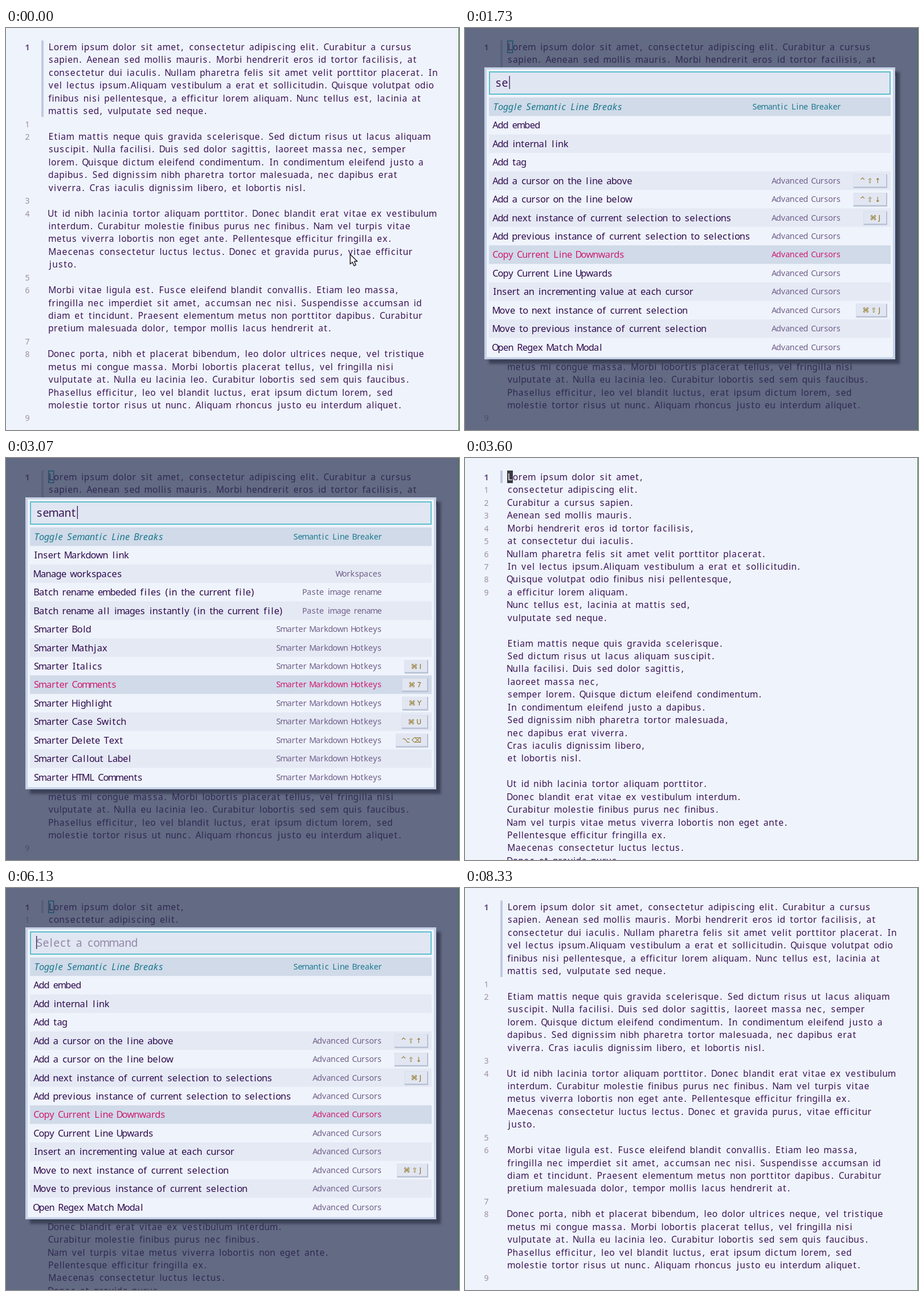
An HTML page with a canvas that plays this animation: 795 px wide and 705 px high, repeating every 9.03 s.

```html
<!DOCTYPE html>
<html lang="en">
<head>
<meta charset="utf-8">
<title>Semantic line breaks</title>
<style>
  html, body { margin: 0; width: 100%; height: 100%; overflow: hidden; background: #eff3fb; }
  canvas { display: block; }
</style>
</head>
<body>
<canvas id="stage" width="795" height="705"></canvas>
<script>
const ctx = document.getElementById('stage').getContext('2d');
const LOOP = 9030, LINE = 22.43, ROW = 32.43;
const SANS = '"Noto Sans", "Open Sans", sans-serif';

const wrapped = `Lorem ipsum dolor sit amet, consectetur adipiscing elit. Curabitur a cursus
sapien. Aenean sed mollis mauris. Morbi hendrerit eros id tortor facilisis, at
consectetur dui iaculis. Nullam pharetra felis sit amet velit porttitor placerat. In
vel lectus ipsum.Aliquam vestibulum a erat et sollicitudin. Quisque volutpat odio
finibus nisi pellentesque, a efficitur lorem aliquam. Nunc tellus est, lacinia at
mattis sed, vulputate sed neque.

Etiam mattis neque quis gravida scelerisque. Sed dictum risus ut lacus aliquam
suscipit. Nulla facilisi. Duis sed dolor sagittis, laoreet massa nec, semper
lorem. Quisque dictum eleifend condimentum. In condimentum eleifend justo a
dapibus. Sed dignissim nibh pharetra tortor malesuada, nec dapibus erat
viverra. Cras iaculis dignissim libero, et lobortis nisl.

Ut id nibh lacinia tortor aliquam porttitor. Donec blandit erat vitae ex vestibulum
interdum. Curabitur molestie finibus purus nec finibus. Nam vel turpis vitae
metus viverra lobortis non eget ante. Pellentesque efficitur fringilla ex.
Maecenas consectetur luctus lectus. Donec et gravida purus, vitae efficitur
justo.

Morbi vitae ligula est. Fusce eleifend blandit convallis. Etiam leo massa,
fringilla nec imperdiet sit amet, accumsan nec nisi. Suspendisse accumsan id
diam et tincidunt. Praesent elementum metus non porttitor dapibus. Curabitur
pretium malesuada dolor, tempor mollis lacus hendrerit at.

Donec porta, nibh et placerat bibendum, leo dolor ultrices neque, vel tristique
metus mi congue massa. Morbi lobortis placerat tellus, vel fringilla nisi
vulputate at. Nulla eu lacinia leo. Curabitur lobortis sed sem quis faucibus.
Phasellus efficitur, leo vel blandit luctus, erat ipsum dictum lorem, sed
molestie tortor risus ut nunc. Aliquam rhoncus justo eu interdum aliquet.
`.split('\n');

const broken = `Lorem ipsum dolor sit amet,
consectetur adipiscing elit.
Curabitur a cursus sapien.
Aenean sed mollis mauris.
Morbi hendrerit eros id tortor facilisis,
at consectetur dui iaculis.
Nullam pharetra felis sit amet velit porttitor placerat.
In vel lectus ipsum.Aliquam vestibulum a erat et sollicitudin.
Quisque volutpat odio finibus nisi pellentesque,
a efficitur lorem aliquam.
Nunc tellus est, lacinia at mattis sed,
vulputate sed neque.

Etiam mattis neque quis gravida scelerisque.
Sed dictum risus ut lacus aliquam suscipit.
Nulla facilisi. Duis sed dolor sagittis,
laoreet massa nec,
semper lorem. Quisque dictum eleifend condimentum.
In condimentum eleifend justo a dapibus.
Sed dignissim nibh pharetra tortor malesuada,
nec dapibus erat viverra.
Cras iaculis dignissim libero,
et lobortis nisl.

Ut id nibh lacinia tortor aliquam porttitor.
Donec blandit erat vitae ex vestibulum interdum.
Curabitur molestie finibus purus nec finibus.
Nam vel turpis vitae metus viverra lobortis non eget ante.
Pellentesque efficitur fringilla ex.
Maecenas consectetur luctus lectus.
Donec et gravida purus,`.split('\n');

// Each command: title | plugin | hotkey
const parse = list => list.split('\n').map(line => line.split('|'));

const allCommands = parse(`Toggle Semantic Line Breaks|Semantic Line Breaker
Add embed
Add internal link
Add tag
Add a cursor on the line above|Advanced Cursors|^⇧↑
Add a cursor on the line below|Advanced Cursors|^⇧↓
Add next instance of current selection to selections|Advanced Cursors|⌘J
Add previous instance of current selection to selections|Advanced Cursors
Copy Current Line Downwards|Advanced Cursors
Copy Current Line Upwards|Advanced Cursors
Insert an incrementing value at each cursor|Advanced Cursors
Move to next instance of current selection|Advanced Cursors|⌘⇧J
Move to previous instance of current selection|Advanced Cursors
Open Regex Match Modal|Advanced Cursors`);

const foundCommands = parse(`Toggle Semantic Line Breaks|Semantic Line Breaker
Insert Markdown link
Manage workspaces|Workspaces
Batch rename embeded files (in the current file)|Paste image rename
Batch rename all images instantly (in the current file)|Paste image rename
Smarter Bold|Smarter Markdown Hotkeys
Smarter Mathjax|Smarter Markdown Hotkeys
Smarter Italics|Smarter Markdown Hotkeys|⌘I
Smarter Comments|Smarter Markdown Hotkeys|⌘7
Smarter Highlight|Smarter Markdown Hotkeys|⌘Y
Smarter Case Switch|Smarter Markdown Hotkeys|⌘U
Smarter Delete Text|Smarter Markdown Hotkeys|⌥⌫
Smarter Callout Label|Smarter Markdown Hotkeys
Smarter HTML Comments|Smarter Markdown Hotkeys`);

// Both typefaces are near-monospaced: a few letter classes, one advance each.
function editorAdvance(ch) {
  if ('mMwW'.includes(ch)) return 14.4;
  if ('il'.includes(ch)) return 5;
  if (ch === 'f') return 6;
  return 'Ijrt .,'.includes(ch) ? 7.3 : 9.6;
}
function menuAdvance(ch) {
  if (ch === 'm') return 13;
  if ('MwW'.includes(ch)) return 12;
  if ('il()'.includes(ch)) return 6.1;
  return 'Ifjrt '.includes(ch) ? 6.8 : 9;
}

const textWidth = (text, advance, scale = 1) =>
  [...text].reduce((sum, ch) => sum + advance(ch) * scale, 0);

function drawText(text, x, y, font, color, advance, scale = 1) {
  ctx.font = `${font} ${SANS}`;
  ctx.fillStyle = color;
  ctx.textAlign = 'center';
  for (const ch of text) {
    const width = advance(ch) * scale;
    ctx.fillText(ch, x + width / 2, y);
    x += width;
  }
  return x;
}

function rect(x, y, w, h, color) {
  ctx.fillStyle = color;
  ctx.fillRect(x, y, w, h);
}

const baseline = row => 39 + row * LINE;

function drawNumber(n, row, active) {
  ctx.font = `${active ? 'bold ' : ''}14px ${SANS}`;
  ctx.fillStyle = active ? '#6a4a86' : '#9b8daa';
  ctx.textAlign = 'right';
  ctx.fillText(n, 41.5, baseline(row));
}

function drawEditor(lines, caret) {
  rect(0, 0, 795, 705, '#eff3fb');
  rect(62, 22, 4, lines === wrapped ? 134 : 22, '#bfc9e0');
  lines.forEach((line, row) =>
    drawText(line, 74, baseline(row), '15.6px', '#3a1556', editorAdvance));

  drawNumber(1, 0, true);
  if (lines === wrapped) {
    let n = 1;
    lines.forEach((line, row) => {
      if (row && (!line || !lines[row - 1])) drawNumber(n++, row);
    });
  } else {
    for (let n = 1; n <= 9; n++) drawNumber(n, n);
  }

  if (caret) {
    rect(74, 22, 10, 22, '#3b3a42');
    drawText('L', 74, baseline(0), '15.6px', '#eff3fb', editorAdvance);
  }
}

function drawKeys(keys, middle) {
  ctx.font = '12px "DejaVu Sans", sans-serif';
  ctx.textAlign = 'left';
  ctx.letterSpacing = '3px';
  const width = ctx.measureText(keys).width + 19;
  const left = 740 - width;
  rect(left, middle - 11, width + 1, 24, '#b7c0d4');
  rect(left, middle - 11, width - 1, 21.5, '#e1e6f2');
  ctx.fillStyle = '#8c6c14';
  ctx.fillText(keys, left + 11, middle + 4.5);
  ctx.letterSpacing = '0px';
}

function drawCommand([title, plugin, keys], row) {
  const top = 121.8 + row * ROW, middle = top + ROW / 2;
  const chosen = row === 0, hovered = row === 8;
  if (row % 2 === 0) rect(42, top, 705, ROW, chosen || hovered ? '#d0dae8' : '#e5e9f4');
  const accent = chosen ? '#1c7990' : hovered ? '#cf1c72' : null;
  drawText(title, 49, middle + 6, `${chosen ? 'italic ' : ''}500 16.4px`,
    accent || '#2e0b4e', menuAdvance);
  if (plugin) {
    drawText(plugin, 659.5 - textWidth(plugin, menuAdvance, .88), middle + 5, '500 14.3px',
      accent || '#705f8c', menuAdvance, .88);
  }
  if (keys) drawKeys(keys, middle);
}

function drawPalette(commands, query, caret) {
  rect(0, 0, 795, 705, 'rgba(40,49,80,.7)');
  ctx.strokeStyle = '#1d4f69';
  ctx.lineWidth = 1.5;
  ctx.strokeRect(74.7, 22.7, 9, 20.6);

  ctx.save();
  ctx.shadowColor = 'rgba(40,46,66,.65)';
  ctx.shadowBlur = 4;
  ctx.shadowOffsetX = ctx.shadowOffsetY = 8;
  rect(34, 69, 721, 512, '#c6d2e8');
  ctx.restore();
  rect(38, 72.5, 713, 505, '#eff3fb');

  rect(42, 76, 705, 41, '#5bbfcd');
  rect(44, 78, 701, 37, '#e0e6f2');
  const end = drawText(query || 'Select a command', 53, 103, '300 19.5px',
    query ? '#3a1556' : '#9487a8', menuAdvance, 1.25);
  if (caret) rect(query ? end + 2 : 53, 84, 1.3, 23, '#3a1556');

  commands.forEach(drawCommand);
}

function drawPointer(shape) {
  ctx.save();
  ctx.translate(604, 396);
  ctx.fillStyle = '#fff';
  ctx.strokeStyle = '#25202f';
  ctx.lineWidth = 1.5;
  ctx.lineJoin = 'round';
  const outline = new Path2D(shape);
  ctx.fill(outline);
  ctx.stroke(outline);
  ctx.restore();
}
const ARROW = 'M0 1V18L4 14.5L6.8 21L10 19.6L7.3 13.3H12.5Z';
const HAND = 'M4 3Q5.5 1 7 4L8.7 9Q10 7.5 11.5 9Q13 8 14 9.6Q16 9 16.5 11L17 15L16 21H8L3 15Q0 12 2 11Q4 11 5.7 13Z';

const within = (t, ...spans) => spans.some(([from, to]) => t >= from && t < to);

const keystrokes = [1470, 1670, 1870, 2000, 2130, 2530];

function draw(t) {
  const isBroken = within(t, [3530, 7800]);
  const open = within(t, [870, 3530], [6130, 7800]);
  const blockOn = within(t, [330, 870], [3530, 4200], [4400, 5130], [5600, 6130], [7800, 8330]);
  drawEditor(isBroken ? broken : wrapped, blockOn);

  if (open) {
    const typed = t < 3530 ? keystrokes.filter(at => t >= at).length : 0;
    const caret = !within(t, [6470, 7130], [7400, 7800]);
    drawPalette(typed >= 3 ? foundCommands : allCommands, 'semant'.slice(0, typed), caret);
  }
  if (t < 730) drawPointer(ARROW);
  else if (t < 1470) drawPointer(HAND);

  rect(794, 0, 1, 705, '#2f7d36');
}

function tick() {
  draw(performance.now() % LOOP);
  requestAnimationFrame(tick);
}
tick();
</script>
</body>
</html>
```
